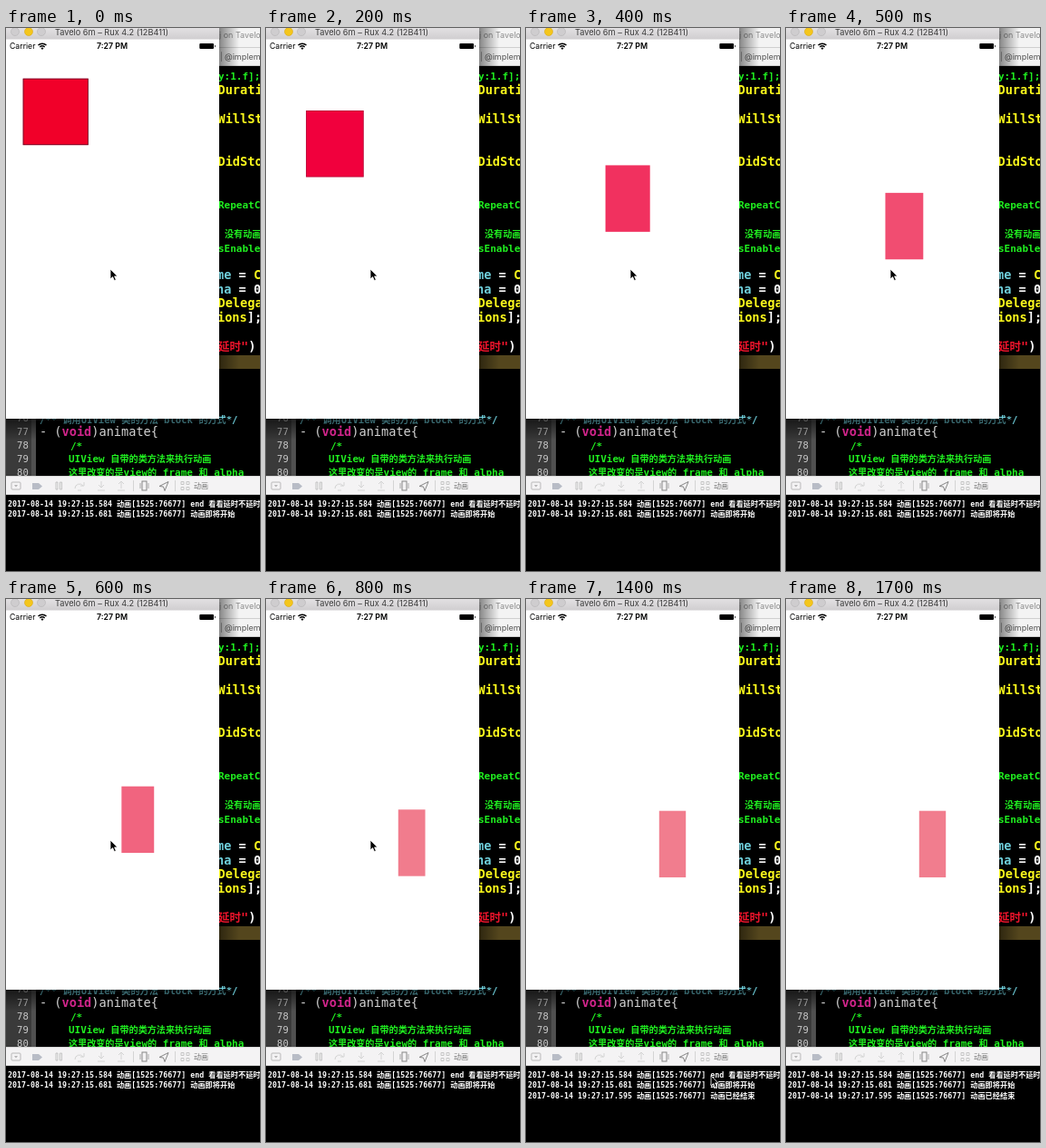
These frames come from a looping animation (280 by 599 pixels, 1.8 s). An HTML page:

```html
<!DOCTYPE html>
<html lang="zh">
<head>
<meta charset="utf-8">
<title>View animation</title>
<style>
html, body { margin: 0; width: 100%; height: 100%; overflow: hidden; background: #000; }
svg { display: block; width: 100vw; height: 100vh; }
text { white-space: pre; }
.ui { font-family: Inter, Roboto, sans-serif; }
.mono { font-family: "DejaVu Sans Mono", "Noto Sans CJK SC", "Noto Sans CJK", monospace; }
.han { font-family: "Noto Sans CJK SC", "Noto Sans CJK", sans-serif; font-size: 10.1px; }
.big { font-size: 13.6px; }
.big .han { font-size: 12.5px; }
.small { font-size: 11px; font-weight: bold; fill: #20f020; }
.log { font-size: 8.3px; font-weight: bold; fill: #fff; }
.log .han { font-size: 8.2px; }
.bold { font-weight: bold; }
.yellow { fill: #fbf81c; }
.cyan { fill: #6fcfdc; }
.white { fill: #fff; }
.red { fill: #f0142c; }
.icons { fill: none; stroke: #b8b8b8; stroke-width: 1; }
</style>
</head>
<body>
<svg viewBox="0 0 280 599" preserveAspectRatio="none">
  <defs>
    <linearGradient id="bar" x2="0" y2="1"><stop stop-color="#e2e0e2"/><stop offset="1" stop-color="#d0ced0"/></linearGradient>
    <linearGradient id="sideShade"><stop stop-color="#000" stop-opacity=".45"/><stop offset="1" stop-color="#000" stop-opacity="0"/></linearGradient>
    <linearGradient id="baseShade" x2="0" y2="1"><stop stop-color="#000" stop-opacity=".6"/><stop offset="1" stop-color="#000" stop-opacity="0"/></linearGradient>
    <clipPath id="editor"><rect y="42" width="280" height="452"/></clipPath>
  </defs>

  <!-- editor -->
  <rect width="280" height="599"/>
  <rect x="230" width="50" height="42" fill="#f3f3f3"/>
  <path d="M230 21.5h50M230 41.5h50" stroke="#cfcfcf"/>
  <g class="ui" font-size="9" fill="#8b8b8b">
    <text x="235" y="11">j on Tavelo</text>
    <text x="236" y="34.5">|</text>
    <text x="241" y="34.5" fill="#555">@impleme</text>
  </g>
  <rect x="230" y="361" width="50" height="15" fill="#54461d"/>
  <path d="M235 0h22v42h-22zM235 361h22v15h-22z" fill="url(#sideShade)"/>

  <g class="mono" clip-path="url(#editor)">
    <g class="small">
      <text x="234" y="57">y:1.f];</text>
      <text x="234" y="199">RepeatC</text>
      <text class="han" x="241" y="230.5">没有动画</text>
      <text x="234" y="247">sEnable</text>
    </g>
    <g class="big bold yellow">
      <text x="233.5" y="73">Durati</text>
      <text x="233.5" y="105">WillSt</text>
      <text x="233.5" y="152">DidSto</text>
      <text x="232" y="277"><tspan class="cyan">me</tspan><tspan class="white"> = </tspan>C</text>
      <text x="232" y="293"><tspan class="cyan">ha</tspan><tspan class="white"> = 0</tspan></text>
      <text x="233.5" y="308">Delega</text>
      <text x="233" y="323.5">ions<tspan class="white">];</tspan></text>
      <text x="234" y="356" class="red"><tspan class="han">延时</tspan>"<tspan class="white">)</tspan></text>
    </g>

    <rect y="431" width="33" height="63" fill="#3a3a3a"/>
    <rect x="28" y="431" width="5" height="63" fill="#505050"/>
    <g font-size="10.6" fill="#c8c8c8">
      <text x="12" y="434">76</text>
      <text x="12" y="449">77</text>
      <text x="12" y="464">78</text>
      <text x="12" y="479">79</text>
      <text x="12" y="494">80</text>
    </g>
    <text x="37" y="436" font-size="10.6" class="bold cyan">/** <tspan class="han">调用</tspan>UIView <tspan class="han">类的方法</tspan> block <tspan class="han">的方式</tspan>*/</text>
    <rect y="431" width="250" height="24" fill="url(#baseShade)"/>
    <text x="37" y="450" class="big" fill="#d2d2d2">- (<tspan class="bold" fill="#d0248a">void</tspan>)animate{</text>
    <g class="small">
      <text x="71" y="465">/*</text>
      <text x="69" y="479">UIView <tspan class="han">自带的类方法来执行动画</tspan></text>
      <text x="69" y="493.5"><tspan class="han">这里改变的是</tspan>view<tspan class="han">的</tspan> frame <tspan class="han">和</tspan> alpha</text>
    </g>
  </g>

  <!-- debug bar -->
  <rect y="494" width="280" height="21" fill="#f4f3f4"/>
  <path d="M0 494.5h280M0 514.5h280" stroke="#d8d8d8"/>
  <g class="icons">
    <rect x="6" y="501" width="10" height="8" rx="1"/>
    <path d="M9 504h4l-2 2.5z" fill="#b4b4b4" stroke="none"/>
    <path d="M29 502h7l4 3.5l-4 3.5h-7z" fill="#b8bcc6" stroke="none"/>
    <path d="M55 501h2v8h-2zM59.5 501h2v8h-2z" stroke-width=".8"/>
    <g stroke="#d4d4d4">
      <path d="M76 508a5 5 0 0 1 9-3M86 501v4h-4M79 510h4"/>
      <path d="M105 500v7M102 504l3 3l3-3M101 510h8"/>
      <path d="M127 508v-8M124 503l3-3l3 3M123 510h8"/>
      <path d="M140.5 499v12M186.5 499v12"/>
    </g>
    <g stroke="#858585">
      <rect x="150" y="500" width="5" height="10"/>
      <path d="M148 502v6M157 502v6" stroke="#a8a8a8"/>
      <path d="M169 505.5l10-5l-4 10l-1.5-4.5z"/>
    </g>
    <path d="M193 500.5h3v3h-3zM199 500.5h3v3h-3zM193 506.5h3v3h-3zM199 506.5h3v3h-3z" stroke="#c6c6c6"/>
  </g>
  <text class="han" x="207" y="508" style="font-size:8px" fill="#777">动画</text>

  <!-- console -->
  <g class="mono log">
    <text x="2" y="527.5">2017-08-14 19:27:15.584 <tspan class="han">动画</tspan>[1525:76677] end <tspan class="han">看看延时不延时</tspan></text>
    <text x="2" y="539">2017-08-14 19:27:15.681 <tspan class="han">动画</tspan>[1525:76677] <tspan class="han">动画即将开始</tspan></text>
    <text x="2" y="551" id="done">2017-08-14 19:27:17.595 <tspan class="han">动画</tspan>[1525:76677] <tspan class="han">动画已经结束</tspan></text>
  </g>

  <!-- simulator window -->
  <rect width="235" height="431" fill="#fff"/>
  <rect width="235" height="12.5" fill="url(#bar)"/>
  <g stroke-width=".6">
    <circle cx="10" cy="4" r="4.5" fill="#cfcdcf" stroke="#b4b2b4"/>
    <circle cx="25" cy="4" r="4.5" fill="#f4c61c" stroke="#d8a818"/>
    <circle cx="39" cy="4" r="4.5" fill="#cfcdcf" stroke="#b4b2b4"/>
  </g>
  <g class="ui">
    <text x="116.5" y="8" font-size="9.2" fill="#3c3c3c" text-anchor="middle">Tavelo 6m – Rux 4.2 (12B411)</text>
    <text x="4" y="23.3" font-size="8.7">Carrier</text>
    <text x="117" y="23.3" font-size="8.8" font-weight="600" text-anchor="middle">7:27 PM</text>
  </g>
  <path d="M35.5 19a6.5 6.5 0 0 1 9 0M37.3 21a4 4 0 0 1 5.4 0" fill="none" stroke="#000" stroke-width="1.4"/>
  <path d="M38.5 22.3a2.2 2.2 0 0 1 3 0l-1.5 1.7z"/>
  <rect x="213.3" y="17" width="15.7" height="6" rx="1"/>
  <path d="M230 18.7a1.4 1.4 0 0 1 0 2.6z"/>

  <rect id="box"/>
  <rect id="edge" fill="none" stroke="#46102a" stroke-width=".8"/>
  <path id="cursor" d="M0 0V11L2.6 8.6L4.4 12.6L6.3 11.8L4.6 7.9H8Z" stroke="#fff" stroke-width=".8"/>
</svg>
<script>
const LOOP = 1800, STEP = 100;
const START = -121, DURATION = 983;
const [box, edge, cursor, done] = ['box', 'edge', 'cursor', 'done'].map(id => document.getElementById(id));

// time, x, y of the pointer
const pointer = [
  [1000, 115, 266], [1100, 122, 282], [1200, 152, 368],
  [1300, 188, 472], [1400, 204, 526], [1500, 208, 562], [1600, 212, 605]
];

const clamp = v => Math.min(1, Math.max(0, v));
const mix = (a, b, p) => a + (b - a) * p;
const set = (el, attrs) => Object.entries(attrs).forEach(([k, v]) => el.setAttribute(k, v));
const place = (el, x, y, width, height) => set(el, { x, y, width, height });

// cubic-bezier(.42, 0, .58, 1), solved by bisection
function easeInOut(x) {
  let lo = 0, hi = 1;
  for (let i = 0; i < 24; i++) {
    const s = (lo + hi) / 2, r = 1 - s;
    if (1.26 * s * r * r + 1.74 * s * s * r + s * s * s < x) lo = s; else hi = s;
  }
  return lo * lo * (3 - 2 * lo);
}

function drawBox(t) {
  const p = easeInOut(clamp((t - START) / DURATION));
  const x = mix(14.7, 146.8, p), y = mix(50.2, 233.7, p), w = mix(73.4, 29.4, p), h = 73.4;
  place(box, x, y, w, h);
  place(edge, x + 0.4, y + 0.4, w - 0.8, h - 0.8);
  set(box, { fill: `rgb(241,${Math.round(Math.max(0, 170 * p - 45))},${Math.round(38 + 104 * p)})` });
  set(edge, { 'stroke-opacity': clamp(0.9 - 2.5 * p) });
}

function drawPointer(t) {
  const [, x, y] = pointer.findLast(k => k[0] <= t) || pointer[0];
  set(cursor, { transform: `translate(${x} ${y})` });
}

function frame() {
  const t = Math.floor(performance.now() % LOOP / STEP) * STEP;
  drawBox(t);
  drawPointer(t);
  done.style.visibility = t >= 900 ? 'visible' : 'hidden';
  requestAnimationFrame(frame);
}
frame();
</script>
</body>
</html>
```
